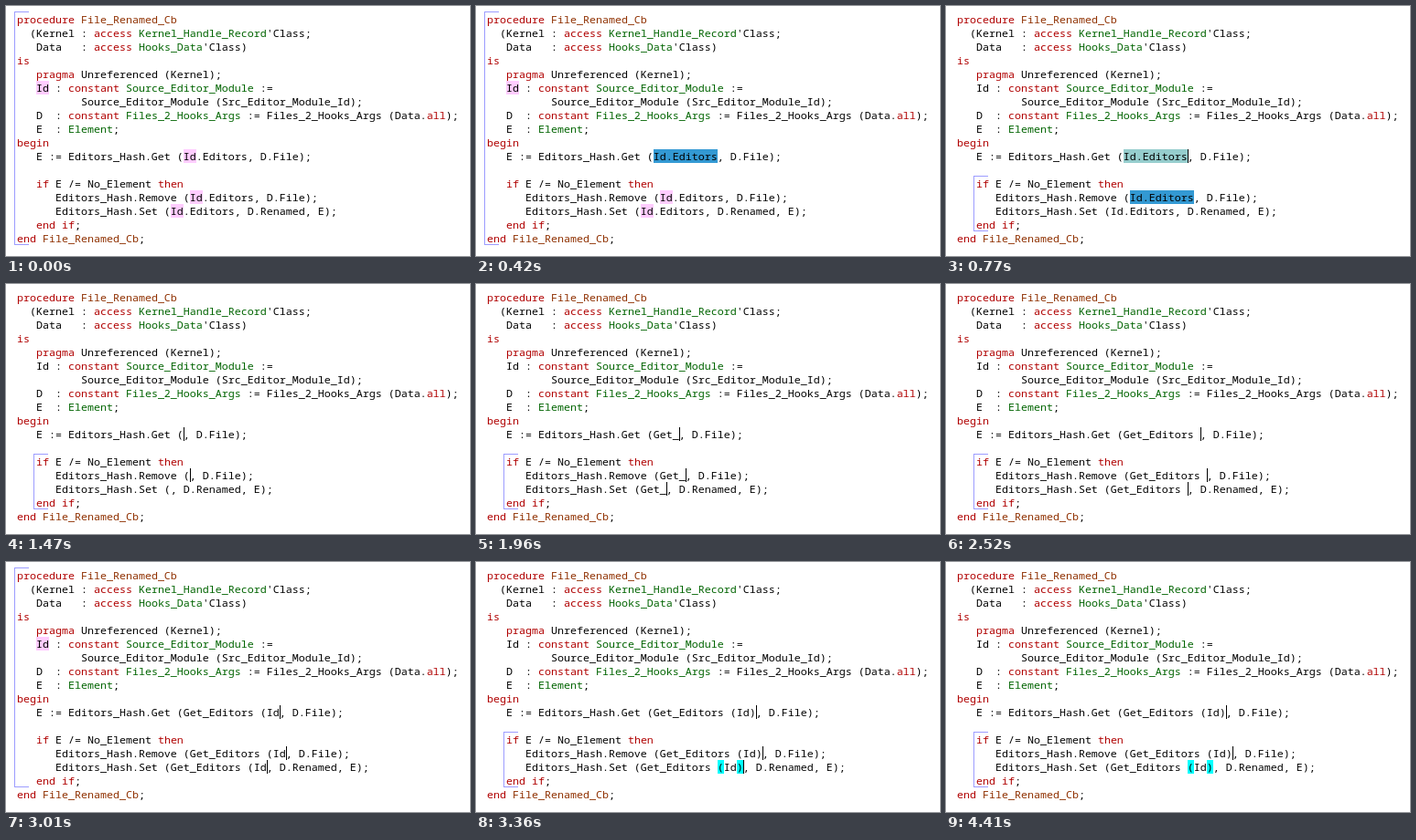
Animation, 507 px wide and 274 px high, one loop 5040 ms. Source, as an HTML page:

```html
<!DOCTYPE html>
<html lang="en">
<head>
<meta charset="utf-8">
<title>Multi-cursor editing</title>
<style>
  html, body { margin: 0; width: 100%; height: 100%; overflow: hidden; background: #fff; }
  #stage { position: relative; width: 507px; height: 274px; overflow: hidden; }
  pre {
    position: absolute; left: 12px; top: 7px; margin: 0; color: #000;
    font: 500 11.667px/15px "Noto Sans Mono", "DejaVu Sans Mono", monospace;
    font-variant-ligatures: none;
  }
  pre b, pre i, pre em { font-weight: inherit; font-style: normal; }
  pre b { color: #b00000; }
  pre i { color: #006400; }
  pre em { color: #8f3000; }
  #marks div, #carets div { position: absolute; height: 15px; }
  #carets div { width: 1px; background: #000; }
  #bracket { position: absolute; box-sizing: border-box; width: 16px; border: solid #9c9cff; border-width: 1px 0 1px 1px; }
</style>
</head>
<body>
<div id="stage">
<div id="marks"></div>
<div id="bracket"></div>
<pre>
<b>procedure</b> <em>File_Renamed_Cb</em>
  (Kernel : <b>access</b> <i>Kernel_Handle_Record</i>'Class;
   Data   : <b>access</b> <i>Hooks_Data</i>'Class)
<b>is</b>
   <b>pragma</b> Unreferenced (Kernel);
   Id : <b>constant</b> <i>Source_Editor_Module</i> :=
          Source_Editor_Module (Src_Editor_Module_Id);
   D  : <b>constant</b> <i>Files_2_Hooks_Args</i> := Files_2_Hooks_Args (Data.<b>all</b>);
   E  : <i>Element</i>;
<b>begin</b>
   E := Editors_Hash.Get (<span></span>, D.File);

   <b>if</b> E /= No_Element <b>then</b>
      Editors_Hash.Remove (<span></span>, D.File);
      Editors_Hash.Set (<span></span>, D.Renamed, E);
   <b>end if</b>;
<b>end</b> <em>File_Renamed_Cb</em>;
</pre>
<div id="carets"></div>
</div>
<script>
const LOOP = 5040, CHAR = 7, LINE = 15, LEFT = 12, TOP = 7;
const PINK = '#ffccff', BLUE = '#3399d3', TEAL = '#96cdcd', CYAN = '#00ffff';
const OLD = 'Id.Editors', NEW = 'Get_Editors (Id)';

// Row and column of each edited place
const slots = [[10, 26], [13, 27], [14, 24]];
const declaration = [5, 3, 2, PINK];
const brackets = { whole: [9, 6, 256], body: [9, 6, 241], branch: [30, 186, 61] };

const slotMark = (slot, length, color, offset = 0) =>
  [slots[slot][0], slots[slot][1] + offset, length, color];
const pinkIds = [declaration, ...slots.map((_, i) => slotMark(i, 2, PINK))];
const parens = [slotMark(2, 1, CYAN, 12), slotMark(2, 1, CYAN, 15)];

// Each step changes some properties; carets are [slot, offset]
const steps = [];
let state = { text: OLD, bracket: 'whole', marks: pinkIds, carets: [] };
const at = (time, change) => steps.push({ ...(state = { ...state, ...change }), time });
const caretsAt = (offset, ...which) => which.map(slot => [slot, offset]);
const type = (time, count, change = {}) =>
  at(time, { text: NEW.slice(0, count), carets: caretsAt(count, 0, 1, 2), ...change });

at(0, {});
at(140, { carets: caretsAt(0, 0) });
at(350, { marks: [...pinkIds, slotMark(0, 2, BLUE)], carets: [] });
at(420, { marks: [...pinkIds, slotMark(0, 10, BLUE)] });
at(490, { marks: [slotMark(0, 10, BLUE)] });
at(770, {
  bracket: 'branch', carets: caretsAt(10, 0),
  marks: [slotMark(0, 10, TEAL), slotMark(1, 10, BLUE)]
});
at(910, {
  carets: caretsAt(10, 0, 1),
  marks: [slotMark(0, 10, TEAL), slotMark(1, 10, TEAL), slotMark(2, 10, BLUE)]
});
at(1470, { text: '', marks: [], carets: caretsAt(0, 0, 1) });
type(1610, 1);
type(1750, 3);
type(1960, 4);
type(2100, 6);
type(2240, 8);
type(2380, 10);
type(2520, 12);
type(2730, 13);
type(2870, 15, { bracket: 'body' });
at(3010, { marks: [declaration] });
type(3290, 16, { bracket: 'branch', marks: [] });
at(3360, { marks: parens });
at(3850, { carets: caretsAt(16, 0, 1) });
at(3990, { carets: caretsAt(16, 0, 1, 2) });
at(4410, { carets: caretsAt(16, 0, 1) });

const byId = id => document.getElementById(id);
const spans = document.querySelectorAll('pre span');
const position = (row, col) => `left:${LEFT + col * CHAR}px;top:${TOP + row * LINE}px;`;

function draw({ text, bracket, marks, carets }) {
  spans.forEach(span => span.textContent = text);
  const [x, y, height] = brackets[bracket];
  byId('bracket').style.cssText = `left:${x}px;top:${y}px;height:${height}px`;
  byId('marks').innerHTML = marks.map(([row, col, length, color]) =>
    `<div style="${position(row, col)}width:${length * CHAR}px;background:${color}"></div>`).join('');
  byId('carets').innerHTML = carets.map(([slot, offset]) =>
    `<div style="${position(slots[slot][0], slots[slot][1] + offset)}"></div>`).join('');
}

const start = performance.now();
let shown;
function tick() {
  const time = (performance.now() - start) % LOOP;
  const step = steps.findLast(s => s.time <= time);
  if (step !== shown) draw(shown = step);
  requestAnimationFrame(tick);
}
tick();
</script>
</body>
</html>
```
